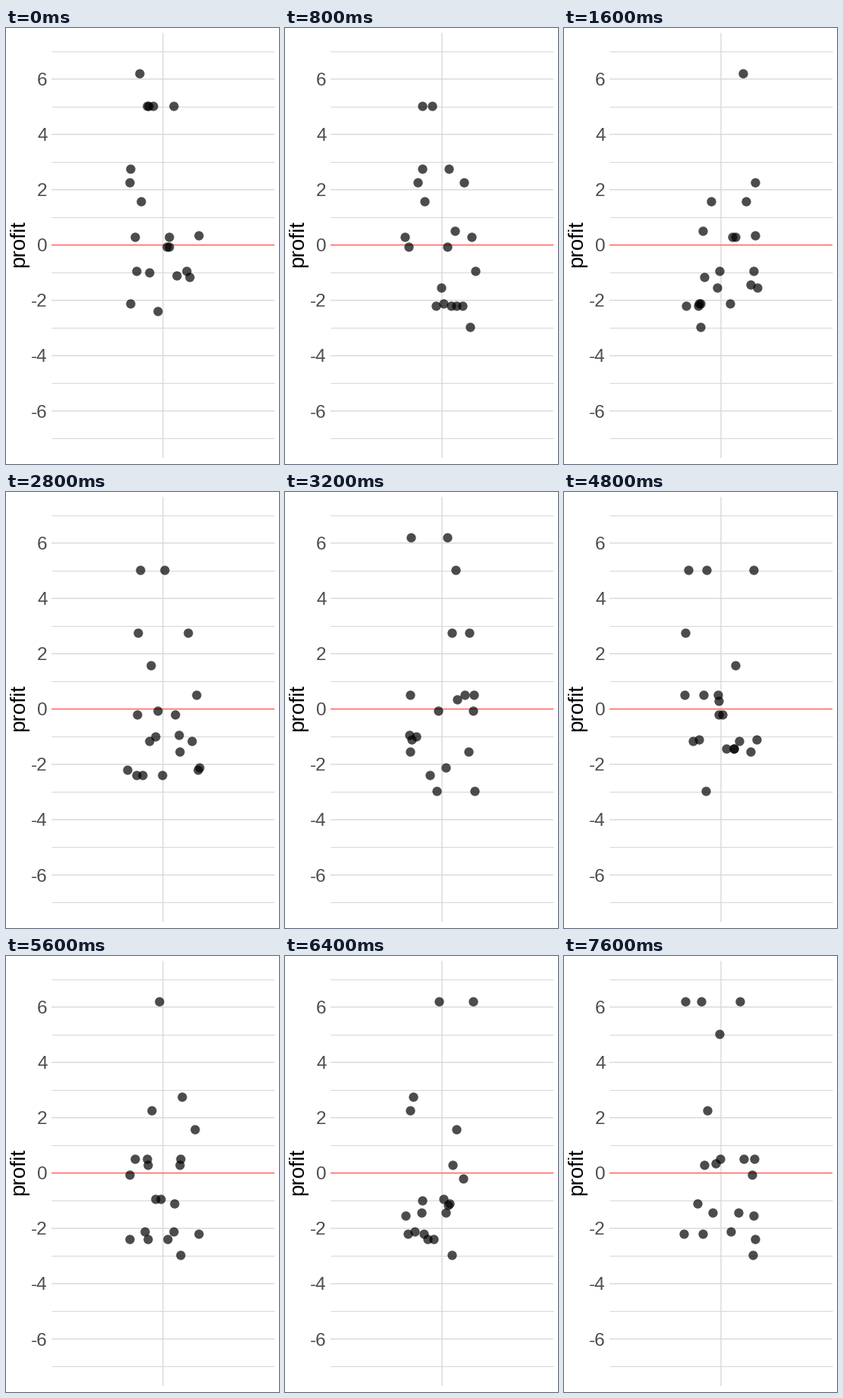
Recreate the animation shown at these times as a matplotlib script. Size 360 by 576 pixels, loop 8 s.

```python
import random

import matplotlib.pyplot as plt
from matplotlib.animation import FuncAnimation

W, H, DPI = 360, 576, 100
PX = 72 / DPI              # points per pixel
LEFT, RIGHT, TOP, BOTTOM = 60, 354, 6.5, 568
ZERO, UNIT, MID = 286.7, 36.54, 207
N_DRAWS, STEP, JITTER = 20, 400, 49

PROFITS = [6.2, 5.03, 2.76, 2.25, 1.58, 0.51, 0.36, 0.3, -0.05, -0.21,
           -0.94, -0.98, -1.09, -1.17, -1.44, -1.53, -2.12, -2.2, -2.4, -2.96]


def row(value):
    return ZERO - UNIT * value


def resample(rng):
    """Draw profits with replacement and spread the points sideways."""
    return [(MID + rng.uniform(-JITTER, JITTER), row(v))
            for v in rng.choices(PROFITS, k=len(PROFITS))]


rng = random.Random(7)
draws = [resample(rng) for _ in range(N_DRAWS)]

fig = plt.figure(figsize=(W / DPI, H / DPI), dpi=DPI, facecolor="white")
ax = fig.add_axes([0, 0, 1, 1])
ax.set_xlim(0, W)
ax.set_ylim(H, 0)
ax.axis("off")


def rule(xs, ys, width=1.0, color="#d6d6d6", snap=True):
    ax.plot(xs, ys, color=color, lw=width * PX, solid_capstyle="butt",
            snap=snap)


def label(x, y, text, size, **style):
    ax.text(x, y, text, family="Liberation Sans", size=size * PX,
            va="baseline", **style)


for v in range(-7, 8):
    major = v % 2 == 0
    if v:
        rule([LEFT, RIGHT], [row(v)] * 2, 1.3 if major else 1, snap=not major)
    if major:
        label(54.5, row(v) + 8.6, str(v), 24.2, color="#4d4d4d", ha="right")
rule([MID, MID], [TOP, BOTTOM], 1.3, snap=False)
rule([LEFT, RIGHT], [row(0)] * 2, 1.4, "#ff5c5c", snap=False)
label(24, 284.8, "profit", 28, color="black", rotation=90,
      rotation_mode="anchor", ha="center")

dots = ax.scatter([], [], s=(12.3 * PX) ** 2, c="black", alpha=0.7,
                  linewidths=0, zorder=3)
dots.set_snap(False)


def update(i):
    dots.set_offsets(draws[i])
    return [dots]


anim = FuncAnimation(fig, update, frames=N_DRAWS, interval=STEP,
                     repeat=True, repeat_delay=0)
plt.show()
```
